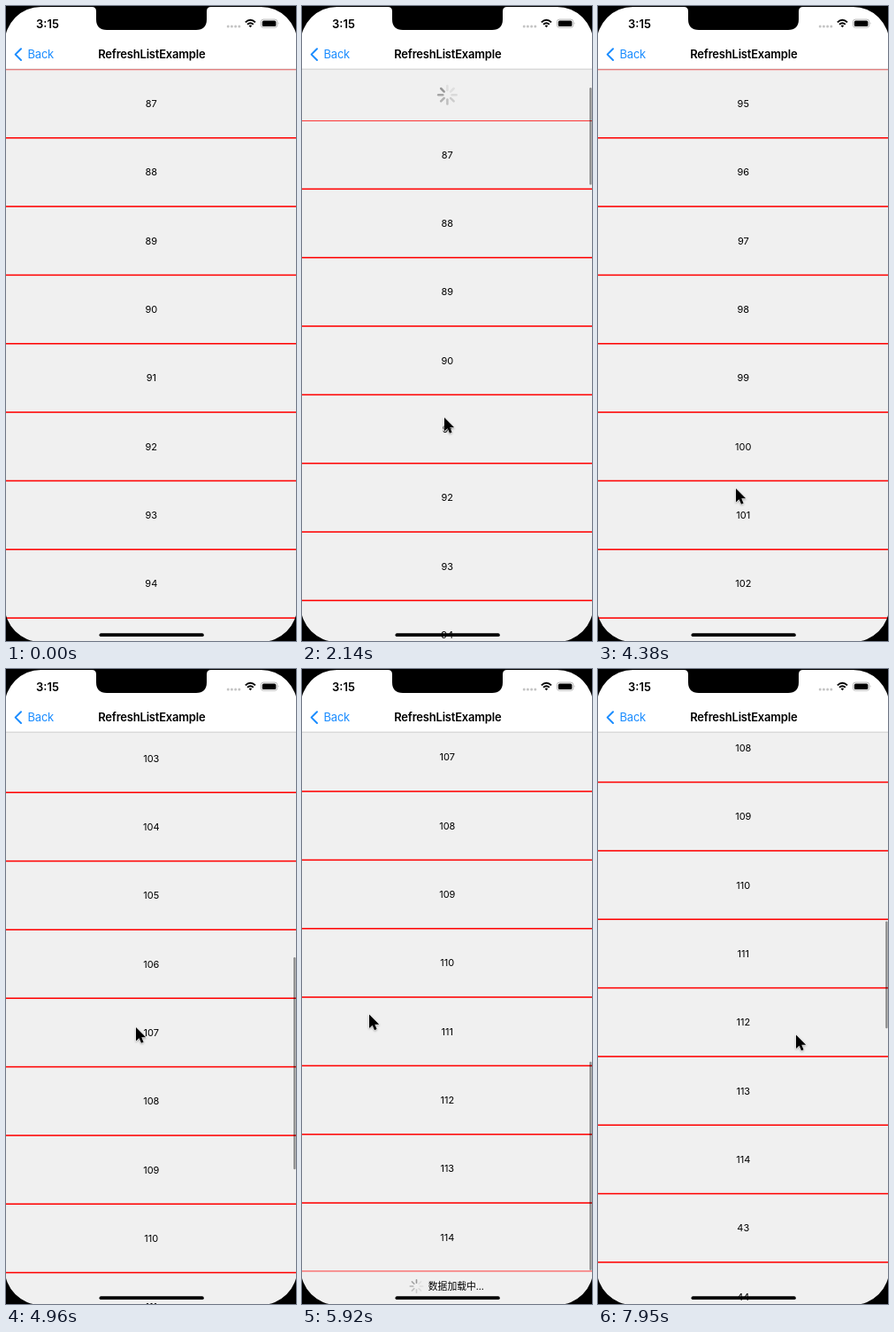
Write an HTML page that moves like this. It is 328 by 716 pixels and loops after 8000 ms.

```html
<!DOCTYPE html>
<html lang="en">
<head>
<meta charset="utf-8">
<title>Refresh list</title>
<style>
  html, body { margin: 0; width: 100%; height: 100%; overflow: hidden; background: #000; }
  svg { display: block; width: 328px; height: 716px; }
  text { font-family: Inter, "Open Sans", sans-serif; }
  .row { font-size: 11px; text-anchor: middle; }
  .bar { font-size: 13px; }
  .bold { font-weight: 600; }
  .foot { font: 10.8px "Noto Sans CJK SC", "Noto Sans CJK", sans-serif; }
</style>
</head>
<body>
<svg viewBox="0 0 328 716">
  <rect width="328" height="716" fill="#f0f0f0"/>
  <g id="pull"></g>
  <g id="rows"></g>
  <g id="footer">
    <g id="wait" transform="translate(129.5 16.6)"></g>
    <text class="foot" lang="zh-CN" x="142.8" y="20.6">数据加载中...</text>
  </g>
  <rect id="thumb" x="325.2" width="2.4" rx="1.2" fill="#000" fill-opacity=".42"/>

  <rect width="328" height="70.9" fill="#fff"/>
  <rect y="70.8" width="328" height=".6" fill="#b4b4b4"/>
  <path d="M17 48.2 L10.6 54.6 L17 61" fill="none" stroke="#1a8cff" stroke-width="2" stroke-linecap="round" stroke-linejoin="round"/>
  <text class="bar" x="24.6" y="59.2" fill="#1a8cff" letter-spacing="-.25">Back</text>
  <text class="bar bold" x="164.8" y="59.2" text-anchor="middle" letter-spacing="-.2">RefreshListExample</text>
  <text class="bar bold" x="34" y="24.6">3:15</text>
  <g fill="#c4c4c4">
    <circle cx="251.2" cy="23" r="1.5"/><circle cx="255.4" cy="23" r="1.5"/>
    <circle cx="259.6" cy="23" r="1.5"/><circle cx="263.8" cy="23" r="1.5"/>
  </g>
  <g fill="none" stroke="#000" stroke-width="1.9">
    <path d="M270.8 18.4 Q276.4 13.2 282 18.4"/>
    <path d="M273 20.8 Q276.4 17.7 279.8 20.8"/>
  </g>
  <path d="M274.6 22.2 Q276.4 20.8 278.2 22.2 L276.4 24.2 Z"/>
  <rect x="288.4" y="15.1" width="18.4" height="9.2" rx="2.7" fill="none" stroke="#a5a5a5" stroke-width=".8"/>
  <rect x="289.8" y="16.5" width="15.6" height="6.4" rx="1.5"/>
  <path d="M307.8 18.1 q1.4 1.5 0 3 z" fill="#a5a5a5"/>

  <rect x="105.5" y="707.2" width="118.3" height="3.9" rx="1.95"/>
  <path d="M97 0 V1 Q102 1 102 6 V15 Q102 27 114 27 H215 Q227 27 227 15 V6 Q227 1 232 1 V0 Z"/>
  <path fill-rule="evenodd" d="M-5 -5 H333 V721 H-5 Z M39.5 1 H288.5 A41 41 0 0 1 329.5 42 V676 A41 41 0 0 1 288.5 717 H39.5 A41 41 0 0 1 -1.5 676 V42 A41 41 0 0 1 39.5 1 Z"/>
  <path id="cursor" d="M0 0 V15.6 L3.6 12.3 L6 17.8 L8.6 16.7 L6.3 11.3 H11.2 Z" stroke="#fff" stroke-width="1" paint-order="stroke"
    style="filter: drop-shadow(0 1px 1px rgba(0,0,0,.3))"/>
</svg>
<script>
const LOOP = 8000, TOP = 71.4, VIEW = 644.6, ROW = 77.333, EDGE = 0.773;
const INSET = 46.4, FOOT = 32.8, END = 20 * ROW + FOOT - VIEW;
const REFRESHED = 3720, LOADED = 7520;

const $ = id => document.getElementById(id);
const clamp = (v, a = 0, b = 1) => Math.min(b, Math.max(a, v));
const smooth = p => p * p * (3 - 2 * p);
const part = (t, a, b) => clamp((t - a) / (b - a));

function add(parent, tag, attrs) {
  const el = document.createElementNS('http://www.w3.org/2000/svg', tag);
  for (const k in attrs) el.setAttribute(k, attrs[k]);
  return parent.appendChild(el);
}

// Eased value of column c in a table of [time, ...values]
function track(table, t, c) {
  const n = table.findIndex(k => k[0] > t);
  if (n < 0) return table[table.length - 1][c];
  if (n === 0) return table[0][c];
  const a = table[n - 1], b = table[n];
  return a[c] + (b[c] - a[c]) * smooth(part(t, a[0], b[0]));
}

const path = [
  [540, -14, 716], [980, 165, 134], [1150, 165, 134], [1700, 161, 464],
  [2860, 161, 464], [3400, 157, 491], [3720, 157, 491], [4300, 156, 544],
  [4380, 156, 544], [4560, 150, 404], [4800, 147, 404], [4980, 147, 404],
  [5200, 143, 510], [5220, 143, 510], [5395, 138.7, 364], [5680, 138.7, 364],
  [6250, -24, 430], [6900, -14, 560], [7350, 224, 504], [7520, 224, 504], [7950, 224, 412.5]
];
const fade = [
  [1150, 0], [1210, 1], [3420, 1], [3720, 0], [4380, 0],
  [4440, 1], [6900, 1], [7200, 0], [7520, 0], [7570, 1]
];

const rubber = d => VIEW * (1 - 1 / (d * 0.55 / VIEW + 1));
const spring = s => (1 + 10.8 * s) * Math.exp(-10.8 * s);
const fling = ms => 140 + 885 * (1 - Math.exp(-0.002 * ms));

function scroll(t) {
  if (t < 1150) return 0;
  if (t < 1800) return -rubber(track(path, t, 2) - 134);
  if (t < REFRESHED) return -INSET - (rubber(330) - INSET) * spring((t - 1800) / 1000);
  if (t < 4380) return -INSET * (1 - smooth(part(t, REFRESHED, 4120)));
  if (t < 4560) return 140 * part(t, 4380, 4560) ** 2.2;
  if (t < 5220) return fling(t - 4560);
  if (t < 5395) return fling(660) + (END - fling(660)) * part(t, 5220, 5395) ** 2.5;
  if (t < LOADED) {
    const s = (t - 5395) / 1000;
    return END + 2140 * s * Math.exp(-10.8 * s);
  }
  return END + 91.6 * smooth(part(t, LOADED, 7950));
}

function spinner(parent, r0, r1, w) {
  return Array.from({ length: 8 }, (_, i) => add(parent, 'line', {
    y1: -r0, y2: -r1, stroke: '#000', 'stroke-width': w,
    'stroke-linecap': 'round', transform: `rotate(${i * 45})`
  }));
}

function spin(spokes, step, shown = 8) {
  spokes.forEach((el, i) => {
    const age = (((Math.floor(step) - i) % 8) + 8) % 8;
    el.setAttribute('stroke-opacity', i < shown ? Math.max(0.07, 0.37 - age * 0.055) : 0);
  });
}

const pullSpokes = spinner($('pull'), 5.2, 10.2, 2.5);
const waitSpokes = spinner($('wait'), 3.8, 7.2, 1.6);
const pool = Array.from({ length: 11 }, () => {
  const g = add($('rows'), 'g', {});
  return {
    g,
    line: add(g, 'rect', { width: 328, fill: '#f00' }),
    text: add(g, 'text', { class: 'row', x: 164.3, y: ROW / 2 + 4 })
  };
});

function label(i, t) {
  if (t < REFRESHED) return 87 + i;
  return i < 20 ? 95 + i : 23 + i;
}

function draw(t) {
  const s = scroll(t), gap = Math.max(0, -s);
  const count = t >= REFRESHED && t < LOADED ? 20 : 40;
  const first = Math.max(0, Math.floor(s / ROW));

  pool.forEach(({ g, line, text }, n) => {
    const i = first + n;
    g.setAttribute('display', i > count ? 'none' : 'inline');
    g.setAttribute('transform', `translate(0 ${TOP + i * ROW - s})`);
    line.setAttribute('y', i ? -EDGE : 0);
    line.setAttribute('height', i && i < count ? 2 * EDGE : EDGE);
    text.textContent = i < count ? label(i, t) : '';
  });
  $('footer').setAttribute('transform', `translate(0 ${TOP + count * ROW - s})`);
  spin(waitSpokes, t / 125 + 0.9);

  const ending = t >= REFRESHED;
  $('pull').setAttribute('transform', `translate(164.4 ${TOP + gap / 2})`);
  $('pull').setAttribute('opacity', ending ? clamp(gap / INSET) : 1);
  spin(pullSpokes, t / 125 + 6.4, t < 1700 ? Math.floor(gap / 12) : gap > 0.5 ? 8 : 0);

  const total = count * ROW + FOOT, max = total - VIEW, span = 586;
  const over = Math.max(0, gap - (ending ? 0 : INSET), s - max);
  const full = span * VIEW / total, size = full - over;
  const y = s > max ? 92 + span - size : 92 + (span - full) * clamp(s / max);
  $('thumb').setAttribute('y', y);
  $('thumb').setAttribute('height', size);
  $('thumb').setAttribute('opacity', track(fade, t, 1));

  const away = t < 540 || (t > 6250 && t < 6900);
  $('cursor').setAttribute('display', away ? 'none' : 'inline');
  $('cursor').setAttribute('transform', `translate(${track(path, t, 1)} ${track(path, t, 2)})`);
}

function tick() {
  draw(performance.now() % LOOP);
  requestAnimationFrame(tick);
}
tick();
</script>
</body>
</html>
```
